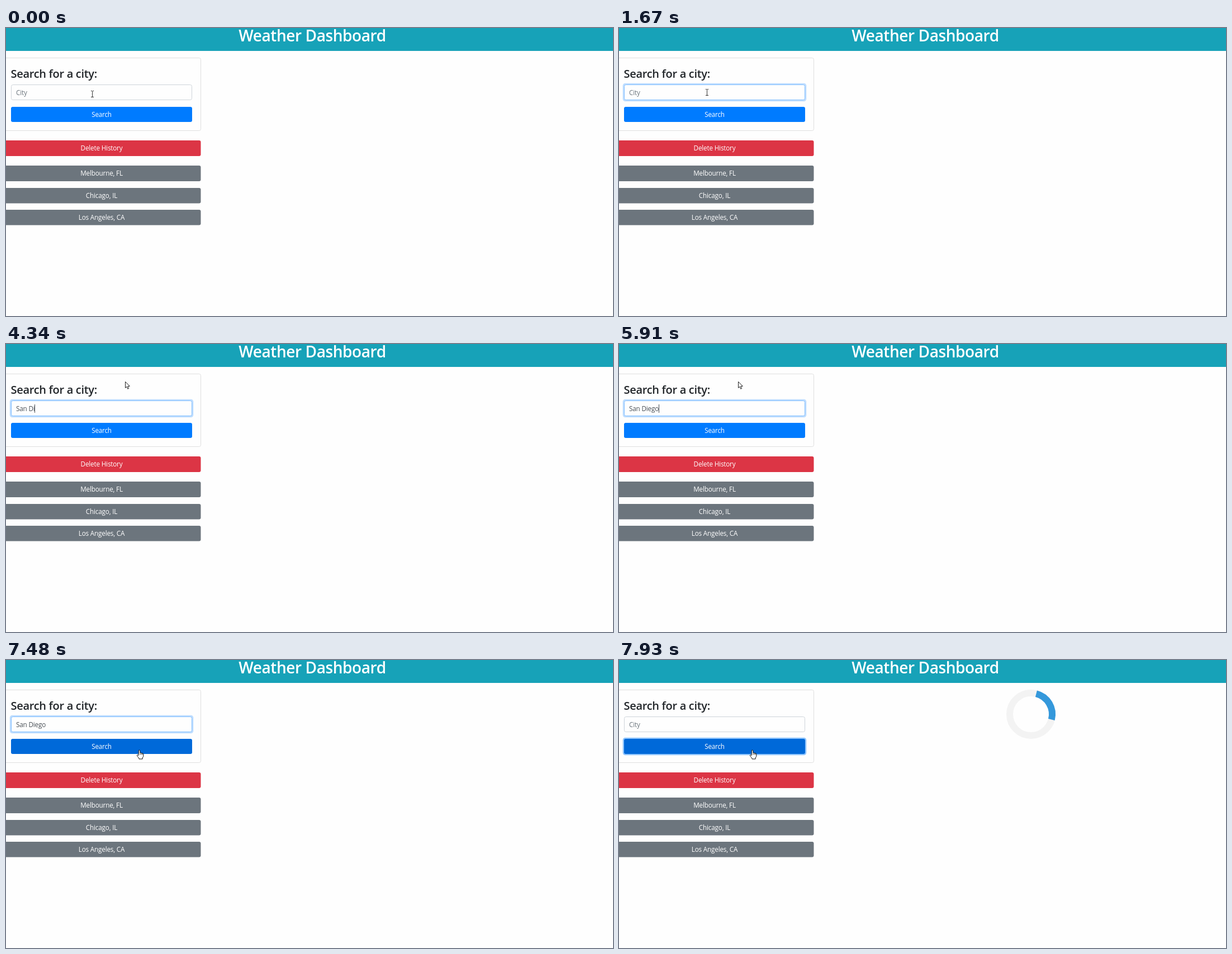
These frames come from a looping animation (1086x515 px, 8000 ms). An HTML page with a canvas:

```html
<!DOCTYPE html>
<html lang="en">
<head>
<meta charset="utf-8">
<title>Weather Dashboard</title>
<style>
  html, body { margin: 0; width: 100%; height: 100%; overflow: hidden; background: #fefefe; }
  canvas { display: block; }
</style>
</head>
<body>
<canvas id="stage" width="1086" height="515"></canvas>
<script>
const ctx = document.getElementById('stage').getContext('2d');
const LOOP = 8000, STEP = 90;
const PAGE = '#fefefe', PRIMARY = [0, 123, 255], PRIMARY_HOVER = [0, 105, 217];
const INPUT = { x: 9, y: 101, w: 324, h: 28 };
const SEARCH = { x: 9, y: 141, w: 324, h: 27 };
const CITY = 'San Diego';
const KEY_TIMES = [3330, 3610, 3790, 3880, 4060, 4340, 4520, 4710, 4890];
const CARET_SPANS = [[1030, 1490], [2030, 2490], [3050, 5450], [5910, 6460], [7020, 7480]];
const FOCUS = 1030, PRESS = 7570, SUBMIT = 7660, HOVER = 6460;

const clamp = v => Math.max(0, Math.min(1, v));
const mix = (a, b, k) => a + (b - a) * k;
const smooth = u => u * u * (3 - 2 * u);
const rgb = (a, b, k) => `rgb(${a.map((v, i) => Math.round(mix(v, b[i], k))).join(',')})`;
// Progress of a two-step CSS transition
const fade = (t, start, first) => t < start ? 0 : t < start + STEP ? first : 1;
const hold = (t, start) => start + Math.floor((t - start) / STEP) * STEP;

function text(str, x, y, color, size = 11.7, weight = 400, align = 'center') {
  ctx.font = `${weight} ${size}px "Open Sans", "Noto Sans", sans-serif`;
  ctx.letterSpacing = `${-0.015 * size}px`;
  ctx.textAlign = align;
  ctx.fillStyle = color;
  ctx.fillText(str, x, y);
}

function box(x, y, w, h, r, fill, stroke) {
  const o = stroke ? 0.5 : 0;
  ctx.beginPath();
  ctx.roundRect(x + o, y + o, w - 2 * o, h - 2 * o, r);
  ctx.fillStyle = fill;
  ctx.fill();
  if (stroke) {
    ctx.strokeStyle = stroke;
    ctx.lineWidth = 1;
    ctx.stroke();
  }
}

function ring({ x, y, w, h }, color, alpha) {
  const s = 2.3;
  ctx.save();
  ctx.globalAlpha = alpha;
  box(x - s, y - s, w + 2 * s, h + 2 * s, 4.5, color);
  ctx.restore();
}

function button(label, y, h, fill) {
  box(-6, y, 354.5, h, 3, fill);
  text(label, 171, y + 18, '#fff');
}

function drawInput(t) {
  const focus = fade(t, FOCUS, 0.5) - fade(t, PRESS, 0.6);
  const border = rgb([206, 212, 218], [128, 189, 255], focus);
  if (focus > 0) ring(INPUT, 'rgb(0,123,255)', 0.25 * focus);
  box(INPUT.x, INPUT.y, INPUT.w, INPUT.h, 3, PAGE, border);

  const typed = t < SUBMIT ? CITY.slice(0, KEY_TIMES.filter(k => k <= t).length) : '';
  text(typed || 'City', 18, 120, typed ? '#495057' : '#6c757d', 11.7, 400, 'left');
  if (CARET_SPANS.some(([a, b]) => t >= a && t < b)) {
    const x = typed ? Math.round(17.6 + ctx.measureText(typed).width) : 18;
    ctx.fillStyle = '#495057';
    ctx.fillRect(x, 108, 1, 15);
  }
}

function drawSearch(t) {
  const focus = fade(t, PRESS, 0.5);
  if (focus) ring(SEARCH, 'rgb(38,143,255)', 0.5 * focus);
  box(SEARCH.x, SEARCH.y, SEARCH.w, SEARCH.h, 3, rgb(PRIMARY, PRIMARY_HOVER, fade(t, HOVER, 0.35)));
  text('Search', 171, 159, '#fff');
}

function arc(from, sweep, color) {
  ctx.beginPath();
  ctx.arc(737, 97, 38, from, from + sweep);
  ctx.strokeStyle = color;
  ctx.lineWidth = 12;
  ctx.stroke();
}

function drawSpinner(t) {
  if (t < SUBMIT) return;
  const turn = (hold(t, SUBMIT) - 7600) / 2000 * 2 * Math.PI;
  arc(0, 2 * Math.PI, '#f3f3f3');
  arc(turn - Math.PI * 0.75, Math.PI / 2, '#3498db');
}

function pointer(t) {
  if (t < 6100) {
    const k = smooth(clamp((hold(t, 1670) - 1580) / 630));
    return [mix(154, 213, k), mix(118, 67, k)];
  }
  const k = clamp((hold(t, 6100) - 6060) / 405) ** 1.5;
  return [mix(213, 238, k), mix(67, 161, k)];
}

function polygon(points, fill, stroke) {
  ctx.beginPath();
  points.forEach(([x, y]) => ctx.lineTo(x, y));
  ctx.closePath();
  ctx.fillStyle = fill;
  ctx.fill();
  ctx.strokeStyle = stroke;
  ctx.lineWidth = 1;
  ctx.stroke();
}

function beam() {
  ctx.fillStyle = '#333';
  ctx.fillRect(0, -5, 1, 11);
  for (const y of [-6, 5]) {
    ctx.fillRect(-2, y, 2, 1);
    ctx.fillRect(1, y, 2, 1);
  }
}

function arrow() {
  polygon([[0.5, 0.5], [0.5, 11.5], [3, 9.2], [4.7, 13.3], [6.6, 12.5], [4.9, 8.6], [8.3, 8.4]], '#fff', '#222');
}

function hand() {
  ctx.lineJoin = 'round';
  polygon([
    [-0.6, 0.4], [0.9, 0.1], [1.9, 1], [1.9, 5], [3.6, 4.9], [4.4, 5.7], [5.9, 5.5], [6.4, 6.4],
    [7.5, 6.6], [7.9, 7.6], [7.7, 11.5], [6.2, 14], [6.2, 16], [0, 16], [-0.3, 14.3],
    [-3.5, 10.4], [-3.4, 9], [-2.1, 8.6], [-0.9, 9.8]
  ], '#fff', '#111');
  ctx.fillStyle = '#111';
  for (const x of [1.6, 3.8, 5.8]) ctx.fillRect(x, 5.5, 0.8, 3);
}

function drawPointer(t) {
  const [x, y] = pointer(t).map(Math.round);
  const inside = b => y >= b.y && y < b.y + b.h;
  ctx.save();
  ctx.translate(x, y);
  (inside(INPUT) ? beam : inside(SEARCH) ? hand : arrow)();
  ctx.restore();
}

function draw(t) {
  ctx.fillStyle = PAGE;
  ctx.fillRect(0, 0, 1086, 515);
  ctx.fillStyle = '#17a2b8';
  ctx.fillRect(0, 0, 1086, 41);
  text('Weather Dashboard', 548, 24, '#fff', 28, 600);

  box(-6, 53, 355, 131, 3, PAGE, '#dfdfdf');
  text('Search for a city:', 8.5, 89, '#212529', 20, 600, 'left');
  drawInput(t);
  drawSearch(t);
  button('Delete History', 201, 28, '#dc3545');
  button('Melbourne, FL', 246, 28, '#6c757d');
  button('Chicago, IL', 286, 27.5, '#6c757d');
  button('Los Angeles, CA', 325, 27.5, '#6c757d');
  drawSpinner(t);
  drawPointer(t);
}

const origin = performance.now();
function tick() {
  draw((performance.now() - origin) % LOOP);
  requestAnimationFrame(tick);
}
tick();
</script>
</body>
</html>
```
